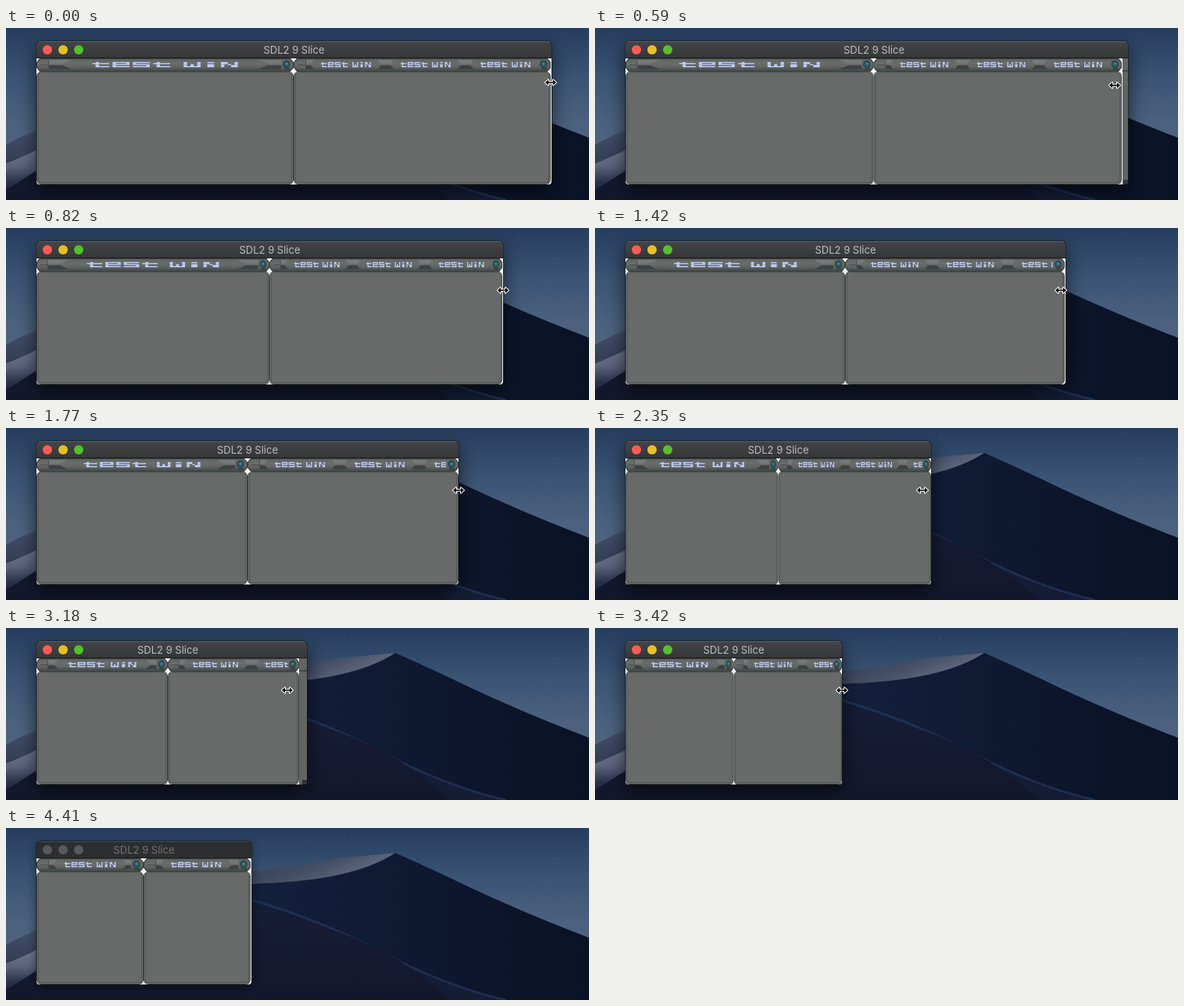
Write an HTML page with a canvas that moves like this. It is 746x221 px and loops after 4510 ms.

```html
<!DOCTYPE html>
<html lang="en">
<head>
<meta charset="utf-8">
<title>SDL2 9 Slice</title>
<style>
  html, body { margin: 0; width: 100%; height: 100%; overflow: hidden; background: #10182c; }
  canvas { display: block; }
</style>
</head>
<body>
<canvas id="stage" width="746" height="221"></canvas>
<script>
const ctx = document.getElementById('stage').getContext('2d');
const LOOP = 4510, STEP = 117.5, RELEASE = 3780, LEAVE = 3900, BLUR = 4410;
const LEFT = 39, TOP = 17, VIEW = 39, BOTTOM = 201;
const CAP = 16, TILE = 102, START_RIGHT = 698;

// each drag moves the right window edge in a few discrete steps
const DRAGS = [
  { start: 590, steps: 4, to: 634 },
  { start: 1300, steps: 5, to: 579 },
  { start: 2120, steps: 5, to: 409 },
  { start: 3180, steps: 4, to: 314 }
];

const WORD = [
  '.#... ##### ##### .#...    #...#  ##  ##..#',
  '##### #...# #.... #####    #...#      ##..#',
  '.#... ##### ##### .#...    #.#.#  ##  #.#.#',
  '.#... #.... ....# .#...    #.#.#  ##  #..##',
  '.#### ##### ##### .####    #####  ##  #..##'
];

function ease(p) {
  const q = Math.min(1, p) ** 0.82;
  return q * q * (3 - 2 * q);
}

function dragState(t) {
  const index = DRAGS.findLastIndex(d => t >= d.start);
  const settled = index > 0 ? DRAGS[index - 1].to : START_RIGHT;
  if (index < 0) return { right: settled, rendered: settled - LEFT, strip: 0, x: settled - 1, y: 70 };

  const { start, steps, to } = DRAGS[index];
  const step = Math.floor((t - start + 10) / STEP);
  // the last step settles two pixels further and redraws the content
  if (step >= steps - 1) return { right: to, rendered: to - LEFT, strip: 0, x: to, y: 80 };
  const edge = ahead => settled + (to + 2 - settled) * ease((step + 1 + ahead) / (steps - 1));
  const right = Math.floor(edge(0));
  return {
    right,
    rendered: settled - LEFT,
    strip: step ? 0 : Math.round((settled - right) * 0.3), // frame trails the first move
    x: Math.round(edge(0.35)),
    y: index ? 80 : 70 + 10 * ease((step + 1) / 3)
  };
}

function gradient(x0, y0, x1, y1, ...colors) {
  const g = ctx.createLinearGradient(x0, y0, x1, y1);
  colors.forEach((c, i) => g.addColorStop(i / (colors.length - 1), c));
  return g;
}

function fillPath(d, fill) {
  ctx.fillStyle = fill;
  ctx.fill(new Path2D(d));
}

function rect(x, y, w, h, fill) {
  ctx.fillStyle = fill;
  ctx.fillRect(x, y, w, h);
}

function disc(x, y, r, fill) {
  ctx.fillStyle = fill;
  ctx.beginPath();
  ctx.arc(x, y, r, 0, 7);
  ctx.fill();
}

function rounded(x, y, w, h, r, fill) {
  ctx.fillStyle = fill;
  ctx.beginPath();
  ctx.roundRect(x, y, w, h, r);
  ctx.fill();
}

function stars() {
  let seed = 7;
  const random = () => (seed = seed * 16807 % 2147483647) / 2147483647;
  for (let i = 0; i < 36; i++) rect(random() * 746 | 0, random() * 100 | 0, 1, 1, `rgba(170,190,215,${random() * .5})`);
}

function desktop() {
  rect(0, 0, 746, 221, gradient(0, 0, 0, 180, '#263d5e', '#3a5373', '#4b617e', '#536580'));
  stars();
  // left dunes
  fillPath('M0 150Q22 138 60 122V221H0Z', gradient(0, 125, 0, 170, '#46536d', '#333d56'));
  fillPath('M0 174Q24 165 60 146V221H0Z', gradient(0, 160, 0, 215, '#6d738a', '#5a6179', '#2c344d', '#151b32'));
  // main dune: lit face, then shadow side
  fillPath('M200 64Q330 58 430 38Q470 35 498 32L460 90H200Z', gradient(390, 36, 405, 72, '#3d485f', '#475168', '#5a637a'));
  fillPath('M40 85Q250 76 330 71Q445 67 498 32Q530 46 570 65Q650 104 746 141V221H40Z',
    gradient(320, 0, 746, 0, '#13203c', '#101b35', '#0c152b', '#0a1226'));
  // front ridges
  const ridge = 'M200 66L316 93Q400 118 474 156Q560 203 640 221';
  fillPath(ridge + 'H200Z', '#141c36');
  ctx.strokeStyle = 'rgba(40,62,104,.55)';
  ctx.lineWidth = 3;
  ctx.stroke(new Path2D(ridge));
  fillPath('M200 82L316 104Q480 134 568 221H0V208Z', gradient(0, 100, 0, 221, '#171d36', '#12172c'));
}

function chamfered(x, y, w, h, c, cv, fill) {
  const r = x + w, b = y + h;
  fillPath(`M${x + c} ${y}H${r - c}L${r} ${y + cv}V${b - cv}L${r - c} ${b}H${x + c}L${x} ${b - cv}V${y + cv}Z`, fill);
}

// one header middle, TILE units wide, starting at x = 0
function tile() {
  for (const x of [0, TILE]) {
    fillPath(`M${x - 10} 41H${x + 10}L${x + 6} 46H${x - 6}Z`, '#757978');
    fillPath(`M${x - 6} 48H${x + 6}L${x + 10} 53H${x - 10}Z`, '#3d4342');
  }
  ctx.fillStyle = '#c9d3fb';
  const cell = 64 / 43;
  WORD.forEach((row, y) => {
    for (const run of row.matchAll(/#+/g))
      ctx.fillRect(19 + run.index * cell, 43.8 + y * 1.3, run[0].length * cell, 1.3);
  });
}

function panel(x, w, tiled) {
  ctx.save();
  ctx.translate(x, 0);
  chamfered(0, 39, w, 17, 4, 5, '#3a4140');
  chamfered(1, 40, w - 2, 15, 4, 5, gradient(0, 40, 0, 55, '#5f6463', '#696d6c', '#606463', '#454b4a'));

  const middle = w - CAP * 2;
  ctx.save();
  ctx.beginPath();
  ctx.rect(CAP, 39, middle, 17);
  ctx.clip();
  ctx.translate(CAP, 0);
  if (tiled) {
    for (let at = 0; at < middle; at += TILE) {
      tile();
      ctx.translate(TILE, 0);
    }
  } else {
    ctx.scale(middle / TILE, 1);
    tile();
  }
  ctx.restore();

  rect(5, 47, CAP - 5, 1, '#4a504f');
  rect(CAP - 1, 41, 1, 14, '#4a504f');
  rect(w - 12, 51, 7, 6, '#3f4645');
  disc(w - 9, 46.5, 5, '#3a4444');
  disc(w - 9, 46.5, 3, '#20636f');
  disc(w - 9, 46, 1.2, '#4b9aa4');

  ['#3b4240', '#6f7472', '#4f5554', '#686a69'].forEach((color, inset) =>
    rounded(inset, 56 + inset * .7, w - inset * 2, BOTTOM - 56 - inset * 1.7, 6 - inset, color));
  ctx.restore();
}

function appWindow({ right, rendered, strip }, focused) {
  const width = right - LEFT, full = width + strip;
  ctx.save();
  ctx.shadowColor = focused ? 'rgba(0,0,0,.62)' : 'rgba(0,0,0,.45)';
  ctx.shadowBlur = focused ? 24 : 14;
  ctx.shadowOffsetY = focused ? 8 : 4;
  rounded(LEFT - .5, TOP - .5, full + 1, BOTTOM - TOP + 1, 5, '#17191b');
  ctx.restore();

  ctx.save();
  ctx.beginPath();
  ctx.roundRect(LEFT, TOP, full, BOTTOM - TOP, [5, 5, 4, 4]);
  ctx.clip();
  rect(LEFT, TOP, full, 22, focused ? gradient(0, TOP, 0, VIEW, '#434446', '#353638') : '#2d2e30');
  rect(LEFT, TOP, full, 1, focused ? '#606163' : '#464749');
  rect(LEFT, VIEW - 1, full, 1, '#1c1d1e');

  ['#fc5b55', '#e6bf29', '#53c22b'].forEach((color, i) => disc(53 + i * 20, 28, 6, focused ? color : '#575859'));
  ctx.font = '13px Inter, "Liberation Sans", sans-serif';
  ctx.textAlign = 'center';
  ctx.fillStyle = focused ? '#bdbebf' : '#6f7071';
  ctx.fillText('SDL2 9 Slice', LEFT + width / 2, 33);

  if (strip) {
    rect(right, VIEW, strip, BOTTOM - VIEW, '#626564');
    rect(right, 54, strip, 2, '#414746');
    rect(right + strip - 6, 195, 6, 6, '#30363a');
  }

  // stale content is squeezed until the drag ends
  const half = Math.floor(rendered / 2);
  ctx.translate(LEFT, 0);
  ctx.scale(width / rendered, 1);
  rect(0, VIEW, rendered, BOTTOM - VIEW, '#fff');
  panel(0, half, false);
  panel(half, half, true);
  ctx.restore();
}

function pointer(x, y, d) {
  const shape = new Path2D(d);
  ctx.save();
  ctx.translate(x, y);
  ctx.lineWidth = 2;
  ctx.lineJoin = 'round';
  ctx.strokeStyle = '#fff';
  ctx.stroke(shape);
  ctx.fillStyle = '#000';
  ctx.fill(shape);
  ctx.restore();
}

function draw(t) {
  const state = dragState(t);
  desktop();
  appWindow(state, t < BLUR);
  if (t < RELEASE) pointer(state.x, state.y, 'M-7 0L-3 -3.6V-.8H3V-3.6L7 0L3 3.6V.8H-3V3.6Z');
  else if (t < LEAVE) pointer(588, 205, 'M0 0V13L3 10L5 15L7 14L5 9.5H9Z');
}

const start = performance.now();
function loop() {
  draw((performance.now() - start) % LOOP);
  requestAnimationFrame(loop);
}
loop();
</script>
</body>
</html>
```
